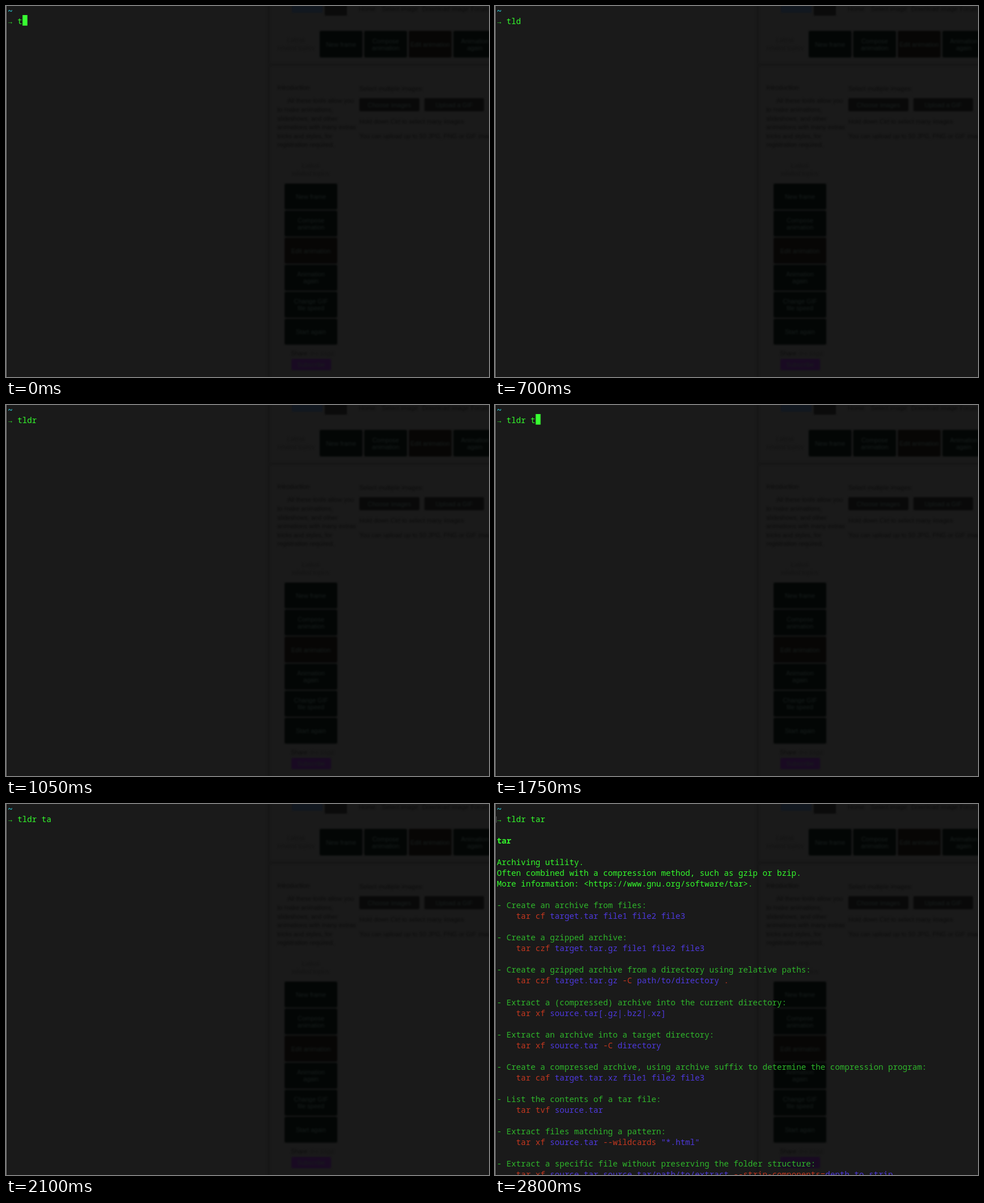
Write an HTML page that moves like this. It is 853x656 px and loops after 4900 ms.

```html
<!DOCTYPE html>
<html lang="en">
<head>
<meta charset="utf-8">
<title>Terminal</title>
<style>
  html, body { margin: 0; width: 100%; height: 100%; overflow: hidden; background: #1a1a1a; }
  svg { display: block; width: 100%; height: 100%; }

  #page { font: 11px "Liberation Sans", Arial, sans-serif; fill: #0d0d0d; filter: blur(1.5px); }
  #page .faint { fill: #141414; }
  #page .label { fill: #171d1c; text-anchor: middle; }

  #terminal { font: 14.22px "Noto Sans Mono", "DejaVu Sans Mono", monospace; fill: #34fb2c; }
  #terminal text { white-space: pre; }
  #terminal .item { fill: #2fb62b; }
  #terminal .flag { fill: #c3371f; }
  #terminal .arg { fill: #4e39de; }
  #terminal .bold { font-weight: 700; }

  /* One 350 ms step per keystroke, then the output appears at 2800 ms. */
  #typed, #cursor, #cursor rect, #output { animation: 4900ms infinite; }
  #typed { animation-name: type; }
  #cursor { animation-name: advance; }
  #cursor rect { animation-name: blink; animation-timing-function: step-end; }
  #output { animation-name: reveal; animation-timing-function: step-end; }

  @keyframes type {
    0% { width: 8.53px; animation-timing-function: steps(8); }
    57.142%, 100% { width: 76.77px; }
  }
  @keyframes advance {
    0% { transform: translateX(0); animation-timing-function: steps(8); }
    57.142%, 100% { transform: translateX(68.24px); }
  }
  @keyframes blink {
    0% { opacity: 1; }
    14.285% { opacity: 0; }
    28.571% { opacity: 1; }
    42.857% { opacity: 0; }
    49.999% { opacity: 1; }
    57.142%, 100% { opacity: 0; }
  }
  @keyframes reveal {
    0% { opacity: 0; }
    57.142%, 100% { opacity: 1; }
  }
</style>
</head>
<body>
<svg viewBox="0 0 853 656" preserveAspectRatio="none">
  <defs>
    <clipPath id="typedClip"><rect id="typed" x="20.2" y="14" width="8.53" height="24"/></clipPath>
  </defs>
  <rect width="853" height="656" fill="#1a1a1a"/>
  <g id="page">
    <path d="M464 -5V670M464 104H860" fill="none" stroke="#171717" stroke-width="5"/>
    <rect x="505" y="-42" width="54" height="54" fill="#121820"/>
    <rect x="563" y="-10" width="39" height="27" fill="#0b0b0b"/>
  </g>
  <g id="terminal">
    <text class="bold" x="3.2" y="13.5" fill="#2fc3d4">~</text>
    <text class="bold" x="3.2" y="32" fill="#2fcb2b">→</text>
    <text x="20.2" y="32" clip-path="url(#typedClip)">tldr tar</text>
    <g id="cursor"><rect x="29.2" y="16" width="8.6" height="18.7" fill="#38fe32"/></g>
    <g id="output"><path d="M2.5 22V33" stroke="#5a5a5a"/></g>
  </g>
  <rect width="1" height="656" fill="#808080"/>
</svg>
<script>
const CELL = 8.53, LEFT = 3.2, ROW = 19.03;
const page = document.getElementById("page");
const output = document.getElementById("output");

function add(parent, tag, attrs, content = "") {
  const node = document.createElementNS("http://www.w3.org/2000/svg", tag);
  for (const key in attrs) node.setAttribute(key, attrs[key]);
  node.textContent = content;
  parent.append(node);
  return node;
}

// Dimmed page behind the window
function note(x, y, content, cls = "") {
  add(page, "text", { x, y: y + 4, class: cls }, content);
}

function button(x, y, width, height, fill, lines) {
  add(page, "rect", { x, y, width, height, fill, rx: 2 });
  lines.forEach((line, i) => {
    const offset = (i - (lines.length - 1) / 2) * 12;
    note(x + width / 2, y + height / 2 + offset, line, "label");
  });
}

const tools = [["New frame"], ["Compose", "animation"], ["Edit animation"],
  ["Animation", "again"], ["Change GIF", "file speed"], ["Start again"]];
const toolFill = i => i === 2 ? "#070605" : "#030605";
tools.forEach((lines, i) => {
  if (i < 4) button(554 + i * 78.7, 44, 75.5, 47, toolFill(i), lines);
  button(492, 314 + i * 47.8, 93, 45.8, toolFill(i), lines);
});

note(623, 5, "Home");
note(664, 5, "Select image");
note(735, 5, "Download image");
note(821, 5, "Forum");
for (const [x, y] of [[512, 60], [538, 282]]) {
  add(page, "text", { x, y: y + 4, class: "faint", "text-anchor": "middle" }, "Latest");
  add(page, "text", { x, y: y + 18, class: "faint", "text-anchor": "middle" }, "related topics");
}
note(479, 144, "Introduction");
note(497, 167, "All these tools allow you");
["to make animations,", "slideshows, and other", "animations with many extras", "tricks and styles, for", "registration required."]
  .forEach((line, i) => note(479, 183 + i * 15.5, line));
note(624, 146, "Select multiple images:");
button(624, 163, 106, 23, "#090909", ["Choose images"]);
button(739, 163, 105, 23, "#090909", ["Upload a GIF"]);
note(624, 204, "Hold down Ctrl to select many images");
note(624, 230, "You can upload up to 50 JPG, PNG or GIF images");
note(503, 614, "Share");
note(537, 614, "the page", "faint");
button(504, 624, 70, 20, "#190a22", ["Subscribe"]);

// Command output; arguments are written in braces
function line(row, col, content, cls = "") {
  return add(output, "text", { x: LEFT + col * CELL, y: 32 + (row - 1) * ROW, class: cls }, content);
}

function command(row, source) {
  const text = line(row, 4, "", "flag");
  source.split(/[{}]/).forEach((part, i) =>
    add(text, "tspan", { class: i % 2 ? "arg" : "flag" }, part));
}

line(3, 0, "tar", "bold");
line(5, 0, "Archiving utility.");
line(6, 0, "Often combined with a compression method, such as gzip or bzip.");
line(7, 0, "More information: <https://www.gnu.org/software/tar>.");

[
  ["Create an archive from files", "tar cf {target.tar file1 file2 file3}"],
  ["Create a gzipped archive", "tar czf {target.tar.gz file1 file2 file3}"],
  ["Create a gzipped archive from a directory using relative paths", "tar czf {target.tar.gz} -C {path/to/directory} ."],
  ["Extract a (compressed) archive into the current directory", "tar xf {source.tar[.gz|.bz2|.xz]}"],
  ["Extract an archive into a target directory", "tar xf {source.tar} -C {directory}"],
  ["Create a compressed archive, using archive suffix to determine the compression program", "tar caf {target.tar.xz file1 file2 file3}"],
  ["List the contents of a tar file", "tar tvf {source.tar}"],
  ["Extract files matching a pattern", "tar xf {source.tar} --wildcards {\"*.html\"}"],
  ["Extract a specific file without preserving the folder structure", "tar xf {source.tar source.tar/path/to/extract} --strip-components={depth_to_strip}"]
].forEach(([title, source], i) => {
  line(9 + i * 3, 0, `- ${title}:`, "item");
  command(10 + i * 3, source);
});
</script>
</body>
</html>
```
